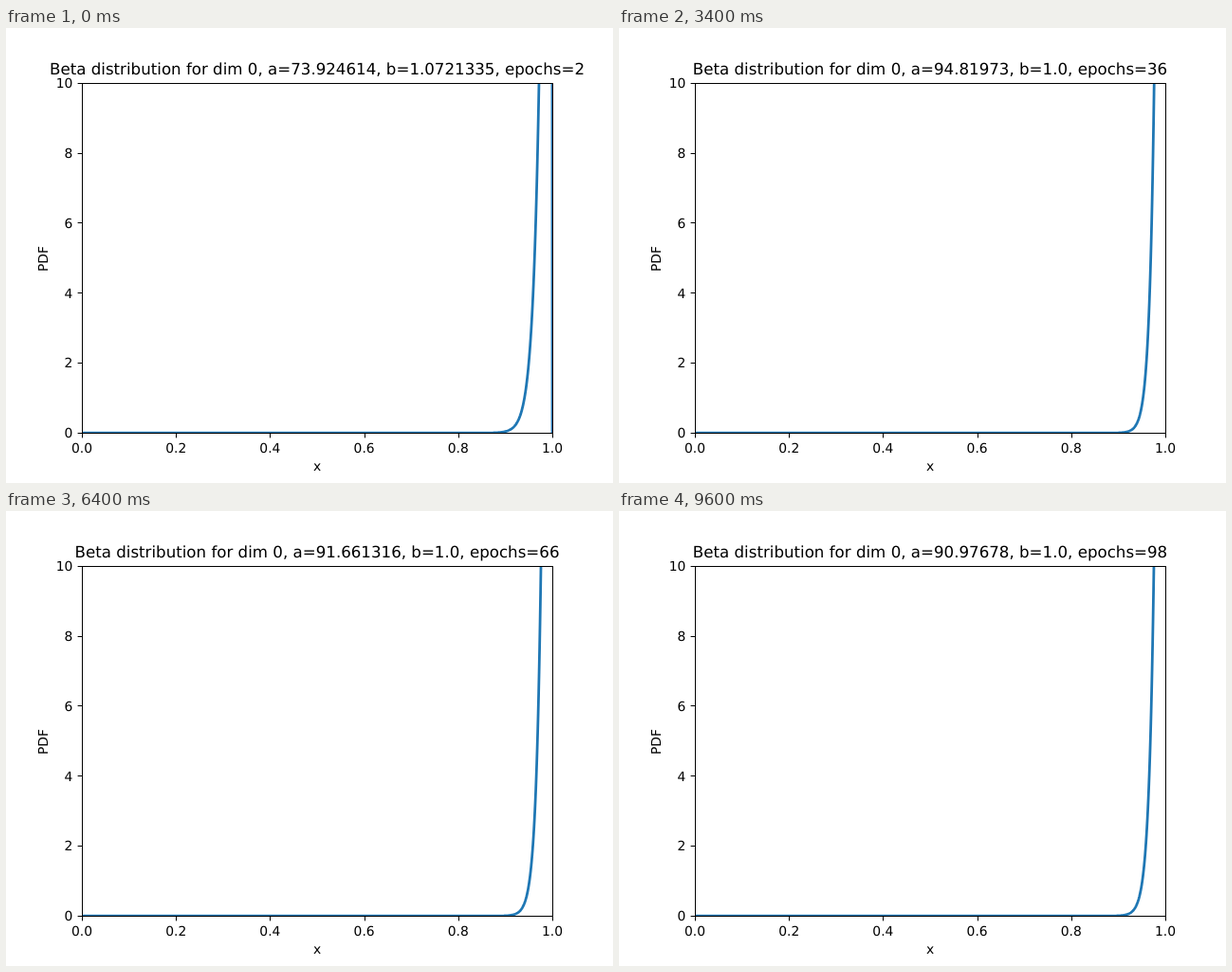
These frames come from a looping animation (640x480 px, 9800 ms). An HTML page with a canvas:

```html
<!DOCTYPE html>
<html lang="en">
<head>
<meta charset="utf-8">
<title>Beta distribution</title>
<style>
  html, body { margin: 0; width: 100%; height: 100%; overflow: hidden; background: #fff; }
  canvas { display: block; }
</style>
</head>
<body>
<canvas id="plot" width="640" height="480"></canvas>
<script>
const ctx = document.getElementById('plot').getContext('2d');
const STEP_MS = 200, STEPS = 49;
const LEFT = 80, RIGHT = 576, TOP = 57.6, BOTTOM = 427.2;

// [step, a]; values in between are interpolated
const KEYS = [[0, 73.924614], [6, 105.12843], [12, 100.71496], [21, 90.10355],
              [32, 91.661316], [39, 90.68965], [48, 90.97678]];

const xPos = x => LEFT + x * (RIGHT - LEFT);
const yPos = y => BOTTOM - y / 10 * (BOTTOM - TOP);
const snap = v => Math.floor(v + 0.5) + 0.5;

function alphaAt(step) {
  const i = Math.max(1, KEYS.findIndex(key => key[0] >= step));
  const [s0, a0] = KEYS[i - 1], [s1, a1] = KEYS[i];
  return a0 + (a1 - a0) * (step - s0) / (s1 - s0);
}

// Shortest decimal that still names the same 32-bit float
function floatText(value) {
  const single = Math.fround(value);
  let digits = 6;
  while (Math.fround(+single.toPrecision(digits)) !== single) digits++;
  return String(+single.toPrecision(digits));
}

// Beta density, with the normaliser approximated for b close to 1
function betaPdf(a, b) {
  const e = b - 1;
  const scale = (a + e / 2) ** b / (1 - 0.5772 * e + 0.989 * e * e);
  return x => scale * x ** (a - 1) * (1 - x) ** e;
}

function line(x1, y1, x2, y2) {
  ctx.beginPath();
  ctx.moveTo(x1, y1);
  ctx.lineTo(x2, y2);
  ctx.stroke();
}

function text(str, x, y, align = 'center', size = 13.89) {
  ctx.font = `${size}px "DejaVu Sans", sans-serif`;
  ctx.textAlign = align;
  ctx.fillText(str, x, y);
}

function drawCurve(pdf) {
  ctx.save();
  ctx.beginPath();
  ctx.rect(LEFT, 58, RIGHT - LEFT, 369);
  ctx.clip();
  ctx.beginPath();
  for (let i = 0; i <= 1000; i++) ctx.lineTo(xPos(i / 1000), yPos(pdf(i / 1000)));
  ctx.strokeStyle = '#1f77b4';
  ctx.lineWidth = 2.78;
  ctx.lineJoin = 'round';
  ctx.stroke();
  ctx.restore();
}

function drawAxes() {
  ctx.strokeStyle = ctx.fillStyle = '#000';
  ctx.lineWidth = 1;
  ctx.strokeRect(snap(LEFT), snap(TOP), RIGHT - LEFT, snap(BOTTOM) - snap(TOP));
  for (let i = 0; i <= 5; i++) {
    const x = xPos(i / 5), y = yPos(i * 2);
    line(snap(x), 427.5, snap(x), 432.4);
    line(75.6, snap(y), 80.5, snap(y));
    text((i / 5).toFixed(1), x, 448);
    text(i * 2, 70.3, Math.round(y + 5.2), 'right');
  }
  text('x', 328, 467);
  ctx.save();
  ctx.translate(44, 243.6);
  ctx.rotate(-Math.PI / 2);
  text('PDF', 0, 0);
  ctx.restore();
}

function draw(now) {
  const step = Math.floor(now / STEP_MS) % STEPS;
  const a = alphaAt(step);
  const b = step ? 1 : 1.0721335;
  ctx.fillStyle = '#fff';
  ctx.fillRect(0, 0, 640, 480);
  ctx.textRendering = 'geometricPrecision';
  drawCurve(betaPdf(a, b));
  drawAxes();
  const bText = step ? '1.0' : b;
  text(`Beta distribution for dim 0, a=${floatText(a)}, b=${bText}, epochs=${2 * step + 2}`,
       328, 49, 'center', 16.67);
}

const start = performance.now();
function tick() {
  draw(performance.now() - start);
  requestAnimationFrame(tick);
}
tick();
</script>
</body>
</html>
```
